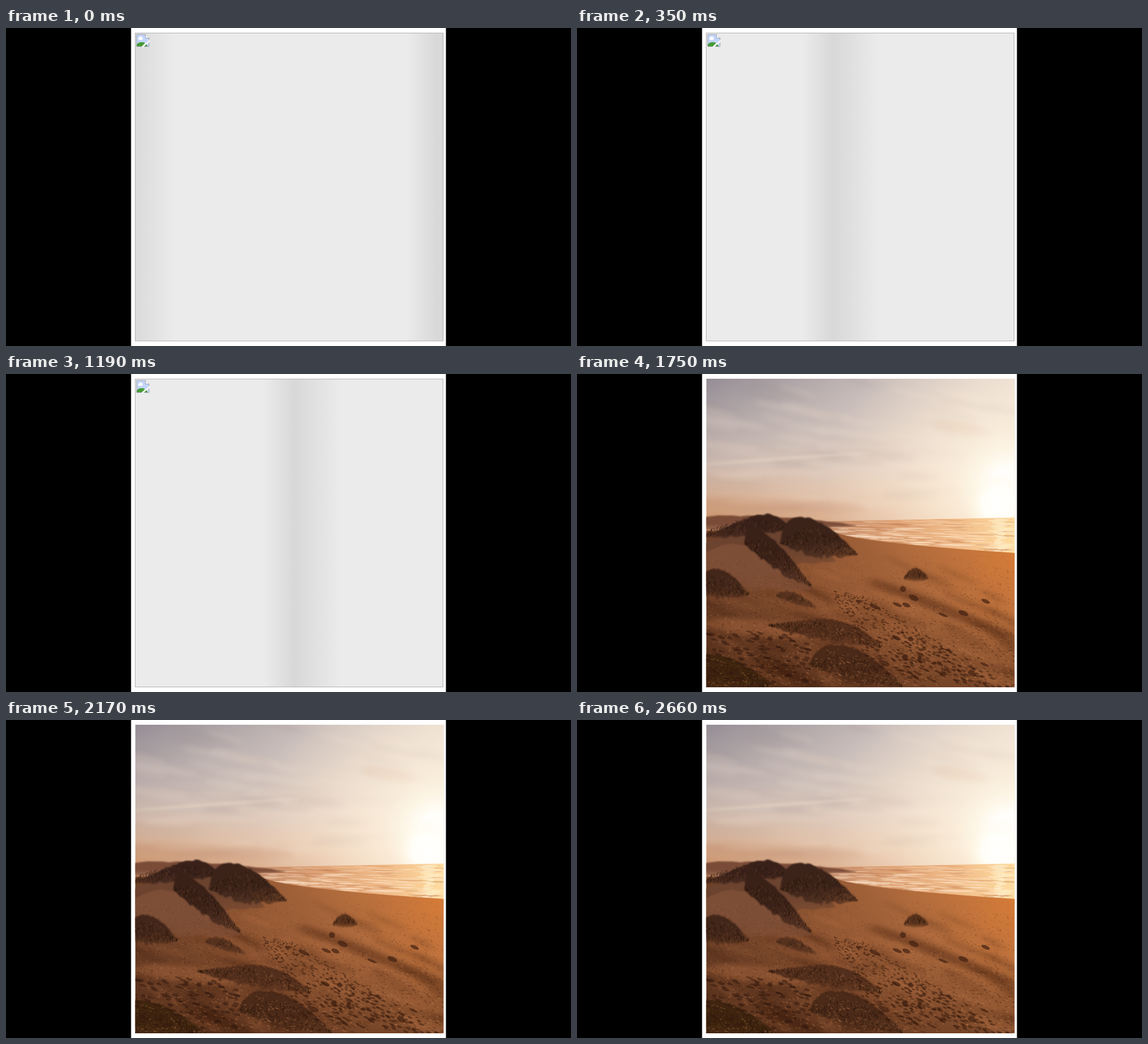
An HTML page with a canvas for the animation above (2.73 s loop, 960 by 540 pixels).

```html
<!DOCTYPE html>
<html lang="en">
<head>
<meta charset="utf-8">
<title>Image placeholder</title>
<style>
  html, body { margin: 0; width: 100%; height: 100%; overflow: hidden; background: #000; }
  canvas { display: block; width: 960px; height: 540px; }
</style>
</head>
<body>
<canvas id="stage" width="960" height="540"></canvas>
<script>
const LOOP = 2730, PHOTO_AT = 1750;
const LEFT = 219.5, TOP = 8, SIZE = 524, RIGHT = LEFT + SIZE, BOTTOM = TOP + SIZE;
// Start time and darkest column of each shimmer position
const SHIMMER = [{ at: 0, peak: 733 }, { at: 350, peak: 435 }, { at: 630, peak: 490 }];

const stage = document.getElementById('stage').getContext('2d');

const horizon = x => 250 - (x - 430) * 0.02;
const shore = x => 262 + 42 * Math.sqrt(Math.max(0, x - 430) / 314);

function seeded(seed) {
  return () => {
    seed = (seed * 1664525 + 1013904223) >>> 0;
    return seed / 4294967296;
  };
}

function layer(paint) {
  const c = document.createElement('canvas');
  c.width = 960;
  c.height = 540;
  paint(c.getContext('2d'));
  return c;
}

// Colours spread evenly along a gradient
function blend(gradient, ...colors) {
  colors.forEach((c, i) => gradient.addColorStop(i / (colors.length - 1), c));
  return gradient;
}

function wash(g, y1, y2, fill) {
  g.fillStyle = fill;
  g.fillRect(LEFT, y1, SIZE, y2 - y1);
}

function glow(g, x, y, r, ...colors) {
  g.fillStyle = blend(g.createRadialGradient(x, y, 0, x, y, r), ...colors);
  g.fillRect(x - r, y - r, 2 * r, 2 * r);
}

function oval(g, x, y, rx, ry, tilt, color) {
  g.fillStyle = color;
  g.beginPath();
  g.ellipse(x, y, rx, ry, tilt, 0, 7);
  g.fill();
}

function clipBox(g) {
  g.beginPath();
  g.rect(LEFT, TOP, SIZE, SIZE);
  g.clip();
}

function frame(g) {
  g.fillStyle = '#000';
  g.fillRect(0, 0, 960, 540);
  g.fillStyle = '#fff';
  g.fillRect(212.5, 0, 535, 540);
}

function paintIcon(g) {
  g.save();
  g.translate(221.5, 10.5);
  const page = new Path2D('M.5 .5H15.5L21.5 6.5V21H.5Z');
  g.fillStyle = '#c3d5fb';
  g.fill(page);
  g.save();
  g.clip(page);
  oval(g, 7, 7.5, 4, 2.2, 0, '#fff');
  oval(g, 7.5, 5.8, 2.2, 2, 0, '#fff');
  oval(g, 9, 22, 10, 8.5, 0, '#459b35');
  g.restore();
  g.strokeStyle = '#9ba0a8';
  g.stroke(page);
  g.fillStyle = '#fff';
  g.fill(new Path2D('M15.5 .5V6.5H21.5Z'));
  g.stroke(new Path2D('M15.5 .5V6.5H21.5'));
  g.strokeStyle = '#f4f4f4';
  g.lineWidth = 3;
  g.stroke(new Path2D('M23 10.5L18 15.5L16 16L10 22'));
  g.restore();
}

function paintSkeleton(g, peak) {
  frame(g);
  g.save();
  clipBox(g);
  wash(g, TOP, BOTTOM, '#ebebeb');
  // The band is a repeating tile, so it wraps around the box
  for (const p of [peak, peak - SIZE]) {
    const band = g.createLinearGradient(p - 52, 0, p + 78, 0);
    band.addColorStop(0, '#ebebeb');
    band.addColorStop(0.4, '#d8d8d8');
    band.addColorStop(1, '#ebebeb');
    g.fillStyle = band;
    g.fillRect(p - 52, TOP, 130, SIZE);
  }
  g.restore();
  g.strokeStyle = '#b4b4b4';
  g.strokeRect(219.5, 8.5, 523, 523);
  paintIcon(g);
}

function paintSky(g, rand) {
  wash(g, TOP, 255, blend(g.createLinearGradient(0, TOP, 0, 252),
    '#958d95', '#a79da0', '#b9aca9', '#cbb7ad', '#d4b096', '#c98f66'));
  wash(g, TOP, 255, blend(g.createLinearGradient(LEFT, 0, RIGHT, 0),
    'rgba(255,240,225,0)', 'rgba(255,240,226,.42)', 'rgba(255,243,230,.8)'));

  // Wisps fall steeply up high and lie flat near the horizon
  g.filter = 'blur(5px)';
  for (let i = 0; i < 70; i++) {
    const x = LEFT + rand() * SIZE, h = rand();
    oval(g, x, TOP + h * 220, 30 + rand() * 60, 2 + rand() * 5, 0.35 * (1 - h) - 0.06,
      i % 3 ? 'rgba(250,232,215,.16)' : 'rgba(140,115,120,.1)');
  }
  oval(g, 650, 92, 45, 12, 0.15, 'rgba(214,178,155,.4)');
  oval(g, 340, 222, 150, 12, 0.04, 'rgba(190,130,100,.25)');
  g.filter = 'blur(2px)';
  oval(g, 360, 143, 145, 2.5, -0.07, 'rgba(240,222,205,.45)');
  g.filter = 'none';

  glow(g, 725, 195, 300, 'rgba(255,247,230,.95)', 'rgba(255,242,220,.62)',
    'rgba(255,235,208,.25)', 'rgba(255,230,200,0)');
  glow(g, 735, 190, 95, '#fff', 'rgba(255,255,252,.92)', 'rgba(255,252,240,.4)', 'rgba(255,248,230,0)');
  glow(g, 716, 222, 55, '#fff', 'rgba(255,255,250,.85)', 'rgba(255,245,220,0)');
}

function paintSea(g, rand) {
  g.fillStyle = blend(g.createLinearGradient(430, 0, RIGHT, 0), '#c68e6c', '#dfa578', '#efb987', '#ffdca0');
  g.beginPath();
  g.moveTo(LEFT, horizon(LEFT));
  g.lineTo(RIGHT + 2, horizon(RIGHT));
  g.lineTo(RIGHT + 2, 315);
  g.lineTo(LEFT, 315);
  g.fill();
  g.filter = 'blur(.6px)';
  for (let i = 0; i < 150; i++) {
    const x = 440 + rand() * 310, d = rand();
    const y = horizon(x) + 2 + d * (shore(x) - horizon(x));
    oval(g, x, y, 8 + rand() * 22, 0.5 + d * 0.6, 0.03,
      i % 3 ? 'rgba(255,232,205,.5)' : 'rgba(185,110,68,.32)');
  }
  for (let y = 247; y < 302; y += 2.5) {
    oval(g, 720 + (rand() - 0.5) * 16, y, 6 + rand() * 14, 1, 0, 'rgba(255,248,215,.65)');
  }
  g.filter = 'none';
}

function paintSand(g, rand) {
  g.beginPath();
  g.moveTo(LEFT, 266);
  for (let x = 425; x <= 750; x += 5) g.lineTo(x, shore(x));
  g.lineTo(750, BOTTOM);
  g.lineTo(LEFT, BOTTOM);
  g.fillStyle = blend(g.createLinearGradient(650, 285, 400, 540), '#c0753f', '#a5643a', '#985b36', '#7d4a2c');
  g.fill();
  g.save();
  g.clip();
  glow(g, 740, 305, 150, 'rgba(228,128,52,.6)', 'rgba(215,118,50,.22)', 'rgba(205,110,50,0)');
  wash(g, 262, BOTTOM, blend(g.createLinearGradient(LEFT, 0, RIGHT, 0),
    'rgba(58,30,18,.35)', 'rgba(58,30,18,.12)', 'rgba(58,30,18,0)', 'rgba(58,30,18,0)'));
  wash(g, 400, BOTTOM, blend(g.createLinearGradient(0, 400, 0, BOTTOM), 'rgba(50,24,12,0)', 'rgba(50,24,12,.38)'));

  // Long drifts run down to the right
  g.filter = 'blur(4px)';
  for (let i = 0; i < 75; i++) {
    const d = rand(), x = LEFT + rand() * SIZE;
    oval(g, x, 325 + d * 200, 18 + rand() * 50, 2 + d * 6, 0.25 + rand() * 0.3,
      i % 5 < 2 ? 'rgba(205,132,80,.2)' : 'rgba(60,28,14,.26)');
  }
  oval(g, 625, 400, 135, 9, 0.38, 'rgba(65,30,14,.42)');
  oval(g, 305, 432, 95, 14, 0.1, 'rgba(190,118,74,.4)');
  g.restore();
}

// Hill over the line x1,y1 - x2,y2 with its crest at the given part of the line
function mound(g, rand, x1, y1, x2, y2, height, crest, color) {
  const bend = Math.log(0.5) / Math.log(crest), steps = 28;
  const point = (u, rise) => g.lineTo(x1 + (x2 - x1) * u, y1 + (y2 - y1) * u - rise);
  g.filter = 'blur(1.3px)';
  g.fillStyle = blend(g.createLinearGradient(0, Math.min(y1, y2) - height, 0, Math.max(y1, y2) + height * 0.4),
    color, color, color + '55');
  g.beginPath();
  for (let i = 0; i <= steps; i++) {
    const bulge = Math.sin(Math.PI * Math.pow(i / steps, bend));
    point(i / steps, height * Math.pow(Math.max(0, bulge), 0.8) + rand() * 3);
  }
  for (let i = steps; i >= 0; i--) {
    const u = i / steps;
    point(u, -height * 0.22 * Math.sin(Math.PI * u) * (0.5 + rand()));
  }
  g.fill();
  g.filter = 'none';
}

// Mound overgrown with short blades
function scrub(g, rand, x1, y1, x2, y2, height, crest, color) {
  mound(g, rand, x1, y1, x2, y2, height, crest, color);
  const count = (x2 - x1) * height / 18;
  g.lineWidth = 0.9;
  for (let i = 0; i < count; i++) {
    const u = rand(), x = x1 + (x2 - x1) * u;
    const y = y1 + (y2 - y1) * u - height * Math.sin(Math.PI * u) * (rand() * 0.85 - 0.15);
    g.strokeStyle = i % 3 ? 'rgba(35,19,10,.55)' : 'rgba(125,80,45,.4)';
    g.beginPath();
    g.moveTo(x, y);
    g.lineTo(x + (rand() - 0.4) * 6, y - 2 - rand() * 4);
    g.stroke();
  }
}

function paintDunes(g, rand) {
  mound(g, rand, 130, 262, 474, 258, 18, 0.35, '#7a4c38');
  mound(g, rand, 205, 300, 440, 318, 46, 0.5, '#6b432f');
  scrub(g, rand, 205, 276, 362, 264, 28, 0.7, '#39211a');
  mound(g, rand, 190, 345, 398, 365, 62, 0.4, '#7d4e36');
  scrub(g, rand, 345, 288, 476, 308, 50, 0.32, '#3b2319');
  scrub(g, rand, 284, 288, 398, 362, 40, 0.3, '#3a2118');
  scrub(g, rand, 190, 366, 290, 376, 38, 0.48, '#422619');
  scrub(g, rand, 340, 378, 406, 398, 14, 0.4, '#57321f');
  scrub(g, rand, 325, 428, 516, 464, 30, 0.6, '#522e1c');
  scrub(g, rand, 395, 494, 553, 532, 46, 0.4, '#4b2a19');
  scrub(g, rand, 150, 530, 335, 534, 55, 0.4, '#3f250f');
  scrub(g, rand, 555, 348, 596, 348, 17, 0.5, '#55301b');
}

function paintPrints(g, rand) {
  // Ripples grow towards the viewer
  for (let i = 0; i < 3200; i++) {
    const d = rand(), x = LEFT + rand() * SIZE, y = 308 + d * 222, s = 0.5 + d;
    oval(g, x, y, s * (1 + rand()), s * 0.7, 0.35,
      i % 5 < 3 ? 'rgba(55,26,12,.32)' : 'rgba(215,142,88,.25)');
  }
  // Footprints fan out from the middle of the beach
  for (let i = 0; i < 420; i++) {
    const d = rand(), spread = (rand() - 0.5) * (50 + 190 * d);
    oval(g, 455 + d * 175 + spread, 370 + d * 155 + spread * 0.1, 1.5 + d * 3, 0.8 + d * 1.1, 0.4,
      'rgba(55,26,13,.5)');
  }
  for (let i = 0; i < 120; i++) {
    oval(g, 222 + rand() * 175, 436 + rand() * 88, 3 + rand() * 4, 1.3 + rand() * 1.4, 0.25, 'rgba(50,25,15,.5)');
  }
  // Loose tufts
  for (let i = 0; i < 16; i++) {
    const x = 430 + rand() * 310;
    oval(g, x, 360 + rand() * 150, 4 + rand() * 6, 2 + rand() * 3, 0.4, 'rgba(66,34,18,.7)');
  }
}

function paintPhoto(g) {
  const rand = seeded(41);
  frame(g);
  g.save();
  clipBox(g);
  paintSky(g, rand);
  paintSea(g, rand);
  paintSand(g, rand);
  paintDunes(g, rand);
  paintPrints(g, rand);
  g.restore();
}

const scenes = SHIMMER.map(({ at, peak }) => ({ at, image: layer(g => paintSkeleton(g, peak)) }));
scenes.push({ at: PHOTO_AT, image: layer(paintPhoto) });
const start = performance.now();

function draw() {
  const t = (performance.now() - start) % LOOP;
  const scene = scenes.filter(s => s.at <= t).pop() || scenes[0];
  stage.drawImage(scene.image, 0, 0);
  requestAnimationFrame(draw);
}
draw();
</script>
</body>
</html>
```
